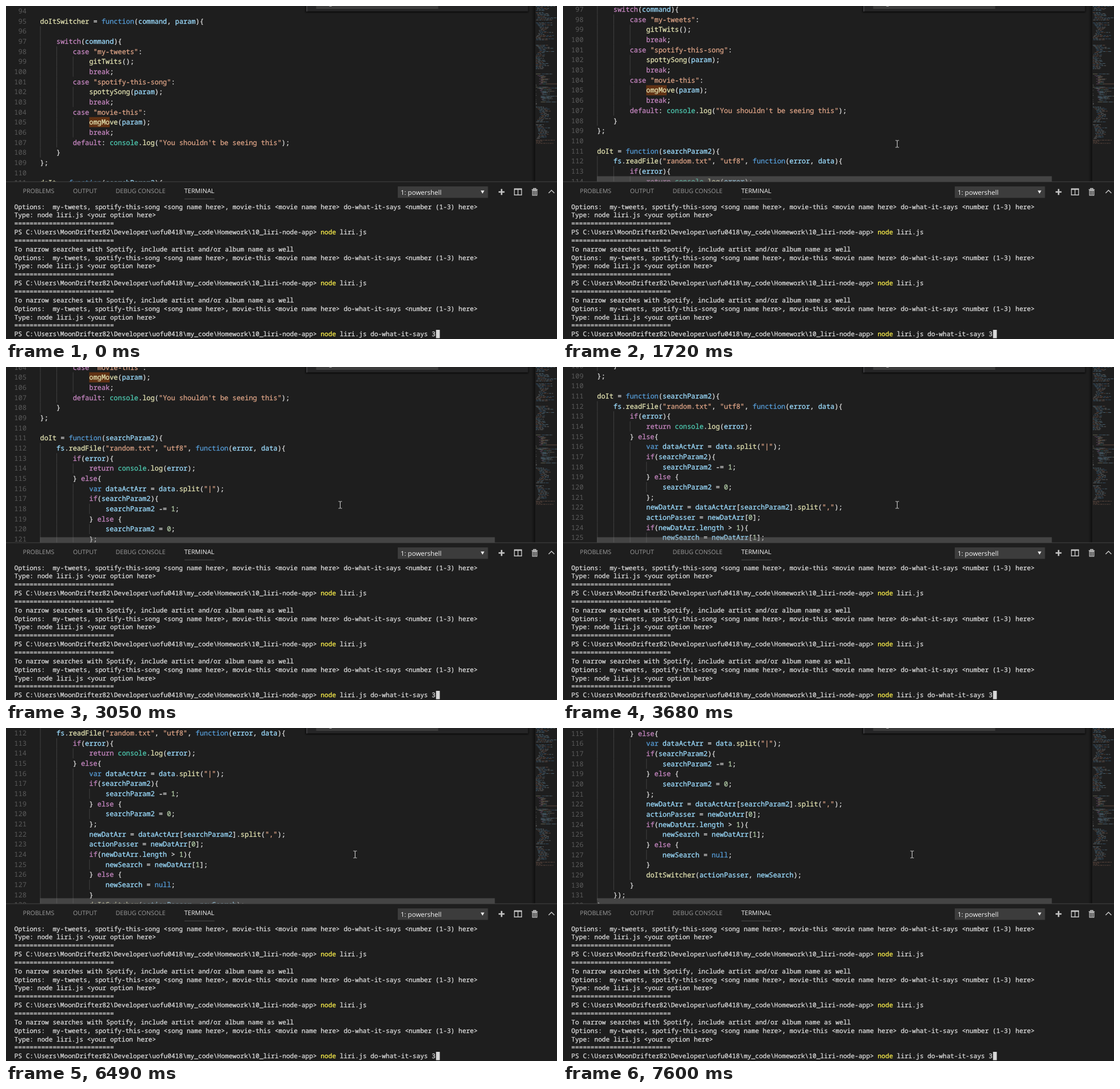
Recreate the animation shown at these times as an HTML page. Size 962 by 582 pixels, loop 8 s.

```html
<!DOCTYPE html>
<html lang="en">
<head>
<meta charset="utf-8">
<title>Editor and terminal</title>
<style>
html, body { margin: 0; width: 100%; height: 100%; overflow: hidden; background: #1e1e1e; }
svg { display: block; width: 962px; height: 582px; }
text { white-space: pre; text-rendering: geometricPrecision; }
text, tspan { fill: currentColor; }
.code, .term, .code tspan, .term tspan { stroke: currentColor; stroke-width: .3px; }
.code { font: 11.91px "Noto Sans Mono", "DejaVu Sans Mono", monospace; color: #dcdcdc; }
.code.num { color: #5a5a5a; text-anchor: end; stroke: none; }
.term { font: 11.15px "Noto Sans Mono", "DejaVu Sans Mono", monospace; color: #dadada; }
.ui { font: 10.6px "Open Sans", "Noto Sans", sans-serif; color: #9b9b9b; }
</style>
</head>
<body>
<svg viewBox="0 0 962 582" xmlns="http://www.w3.org/2000/svg">
  <defs>
    <clipPath id="editorClip"><rect width="922" height="307"/></clipPath>
    <clipPath id="mapClip"><rect x="924" width="38" height="307"/></clipPath>
    <linearGradient id="edge">
      <stop offset="0" stop-color="#000" stop-opacity="0"/>
      <stop offset="1" stop-color="#000" stop-opacity=".5"/>
    </linearGradient>
    <filter id="soft" x="-5%" y="-100%" width="110%" height="400%"><feGaussianBlur stdDeviation="1.8"/></filter>
  </defs>
  <rect width="962" height="582" fill="#1e1e1e"/>

  <g clip-path="url(#editorClip)">
    <g id="code"></g>
    <rect id="bar" x="59.5" y="297.5" width="794" height="10" fill="#797979" fill-opacity=".42"/>
    <rect x="523" y="-10" width="389" height="21" fill="#000" opacity=".8" filter="url(#soft)"/>
    <rect x="524" y="-2" width="387.5" height="11.5" fill="#252526"/>
    <rect x="524" y="-2" width="2.5" height="11.5" fill="#38383b"/>
    <rect x="541.5" y="-2" width="213" height="7" fill="#3c3c3c"/>
    <text class="ui" x="545" y="-2" style="font-size:12px;color:#ccc">omgM</text>
  </g>
  <rect x="917" width="7" height="307" fill="url(#edge)"/>
  <g id="map" clip-path="url(#mapClip)"></g>

  <rect y="306.6" width="962" height="1" fill="#454545"/>
  <g class="ui">
    <text x="29.5" y="327.3">PROBLEMS</text>
    <text x="117" y="327.3">OUTPUT</text>
    <text x="191.6" y="327.3">DEBUG CONSOLE</text>
    <text x="311.3" y="327.3" style="font-size:10.9px;color:#f4f4f4">TERMINAL</text>
  </g>
  <rect x="311.5" y="336.7" width="52.5" height="1" fill="#4c4c4c"/>
  <rect x="684" y="315.3" width="157.5" height="20" fill="#3c3c3c"/>
  <text class="ui" x="689" y="329.8" style="font-size:11.5px;color:#f4f4f4">1: powershell</text>
  <path d="M828.8 322.4h6.4l-3.2 5.6z" fill="#f0f0f0"/>
  <g fill="none" stroke="#c5c5c5">
    <path d="M860 325h10.4M865.2 319.8v10.4" stroke-width="2.6"/>
    <path d="M887.6 320.2h12.6M887.6 319.5v10.8h12.6v-10.8M893.9 320v10" stroke-width="1.4"/>
    <path d="M887 320h13.8" stroke-width="2.6"/>
    <path d="M917.8 321h10.4M921 320.6v-1.6h4v1.6" stroke-width="1.4"/>
    <path d="M919.3 322.4h7.6v8.4h-7.6z" stroke-width="1.3"/>
    <path d="M921.8 323v7M924.4 323v7" stroke-width="1.3"/>
    <path d="M947.4 327l5-5 5 5" stroke-width="1.5"/>
  </g>

  <g id="term"></g>
  <rect x="750.8" y="566" width="6.6" height="14.6" fill="#d8d8d8"/>
  <path id="mouse" d="M-3-6h2q1 0 1 1v10q0 1-1 1h-2M3-6h-2q-1 0-1 1v10q0 1 1 1h2" fill="none" stroke="#d6d6d6"/>
</svg>
<script>
const LOOP = 8000, FIRST = 94, PITCH = 17.67, CHAR = 7.147, LEFT = 59.5;
const $ = id => document.getElementById(id);

function add(parent, tag, attrs, content) {
  const el = document.createElementNS('http://www.w3.org/2000/svg', tag);
  for (const key in attrs) el.setAttribute(key, attrs[key]);
  if (content !== undefined) el.textContent = content;
  parent.appendChild(el);
  return el;
}

const source = `
doItSwitcher = function(command, param){

    switch(command){
        case "my-tweets":
            gitTwits();
            break;
        case "spotify-this-song":
            spottySong(param);
            break;
        case "movie-this":
            omgMove(param);
            break;
        default: console.log("You shouldn't be seeing this");
    }
};

doIt = function(searchParam2){
    fs.readFile("random.txt", "utf8", function(error, data){
        if(error){
            return console.log(error);
        } else{
            var dataActArr = data.split("|");
            if(searchParam2){
                searchParam2 -= 1;
            } else {
                searchParam2 = 0;
            };
            newDatArr = dataActArr[searchParam2].split(",");
            actionPasser = newDatArr[0];
            if(newDatArr.length > 1){
                newSearch = newDatArr[1];
            } else {
                newSearch = null;
            }
            doItSwitcher(actionPasser, newSearch);
        }
    });
};`.split('\n');

const NAME = '#9cdcfe';
const rules = [
  [/^"/, '#dba285'],
  [/^(switch|case|break|default|if|else|return)$/, '#c586c0'],
  [/^(function|var|null)$/, '#569cd6'],
  [/^console$/, '#4ec9b0'],
  [/^\d/, '#b5cea8'],
  [/^[a-z]/i, NAME],
  [/./, '#dcdcdc']
];

// Splits a line into coloured pieces with their columns.
function tokens(line) {
  return [...line.matchAll(/"[^"]*"|[a-z]\w*|\d+|[^a-z\d"]+/gi)].map(m => {
    const rest = line.slice(m.index + m[0].length);
    let color = rules.find(r => r[0].test(m[0]))[1];
    if (color === NAME && /^(\(| = function)/.test(rest)) color = '#e3e3b2';
    return { text: m[0], col: m.index, color };
  });
}

function buildCode() {
  const root = $('code');
  source.forEach((line, i) => {
    const n = FIRST + i, y = 207.2 + (n - 105) * PITCH;
    const depth = n === 96 ? 1 : Math.floor(line.search(/\S|$/) / 4);
    for (let d = 0; d < depth; d++)
      add(root, 'rect', { x: LEFT + d * 4 * CHAR, y: y - 13, width: 1, height: PITCH, fill: '#404040' });
    if (n === 105)
      add(root, 'rect', { x: LEFT + 12 * CHAR, y: y - 13, width: 5 * CHAR, height: PITCH, fill: '#613214' });
    add(root, 'text', { class: 'code num', x: 35.8, y }, n);
    const text = add(root, 'text', { class: 'code', x: LEFT, y });
    tokens(line).forEach(k => add(text, 'tspan', { color: k.color }, k.text));
  });
}

function buildTerminal() {
  const rule = '='.repeat(26);
  const prompt = 'PS C:\\Users\\MoonDrifter82\\Developer\\uofu0418\\my_code\\Homework\\10_liri-node-app> ';
  const help = [
    'To narrow searches with Spotify, include artist and/or album name as well',
    'Options:  my-tweets, spotify-this-song <song name here>, movie-this <movie name here> do-what-it-says <number (1-3) here>',
    'Type: node liri.js <your option here>'
  ];
  const run = [prompt + 'node liri.js', rule, ...help, rule];
  const rows = [...help.slice(1), rule, ...run, ...run, prompt + 'node liri.js do-what-it-says 3'];
  rows.forEach((row, i) => {
    const text = add($('term'), 'text', { class: 'term', x: 14.6, y: 354.6 + i * 14.84 });
    if (!row.startsWith('PS')) { text.textContent = row; return; }
    add(text, 'tspan', {}, prompt);
    add(text, 'tspan', { color: '#f8ec4a' }, 'node');
    add(text, 'tspan', {}, row.slice(prompt.length + 4));
  });
}

function buildMap() {
  let seed = 7;
  const rand = () => (seed = seed * 16807 % 2147483647) / 2147483647;
  const dash = (x, y, width, fill) =>
    add($('map'), 'rect', { x, y, width, height: 0.8, fill, opacity: 0.42 });
  const hues = [NAME, NAME, '#569cd6', '#d4d4d4', '#ce9178'];

  source.forEach((line, i) => tokens(line).forEach(k => {
    if (k.text.trim()) dash(925 + k.col * 0.72, 117 + i * 1.44, k.text.trim().length * 0.66, k.color);
  }));

  // top, bottom, deepest indent, longest line
  const blocks = [
    [0, 8, 3, 34], [11, 25, 4, 30], [29, 54, 9, 28], [55, 60, 1, 36], [68, 86, 7, 30],
    [87, 110, 0, 24], [176, 203, 10, 26], [207, 233, 7, 20], [234, 241, 1, 36]
  ];
  blocks.forEach(([top, bottom, indent, len]) => {
    for (let y = top; y < bottom; y += 1.86) {
      const p = (y - top) / (bottom - top);
      let x = 925 + indent * Math.sin(Math.PI * p) * (0.6 + 0.4 * rand());
      const end = x + len * (0.2 + 0.8 * rand());
      while (x < end) {
        const w = 1.5 + 4 * rand();
        dash(x, y, w, top === 234 ? hues[4] : hues[Math.floor(rand() * hues.length)]);
        x += w + 1.2;
      }
    }
  });
}

// first step time, last step time, steps, offset reached
const scrolls = [
  [1230, 1720, 7, 55.7], [1800, 2430, 9, 111.6], [2500, 3680, 16, 258.2], [3750, 3840, 2, 269],
  [5630, 5630, 1, 278.5], [5710, 5950, 4, 309], [6490, 6490, 1, 317.8],
  [6570, 6900, 5, 343.5], [7050, 7130, 2, 354], [7430, 7600, 3, 370.2]
];

// Share of a stepped move that is done at time t.
function stepped(t, start, end, count) {
  if (t < start) return 0;
  if (t >= end) return 1;
  return (1 + Math.floor((t - start) / (end - start) * (count - 1) + 1e-6)) / count;
}

function scrollAt(t) {
  let y = 0;
  for (const [start, end, count, to] of scrolls) y += (to - y) * stepped(t, start, end, count);
  return y;
}

function mouseAt(t) {
  const enter = (stepped(t, 290, 680, 6) - 1 / 6) * 1.2;
  const p = 1 - (1 - enter) ** 2;
  const shift = stepped(t, 4300, 4390, 2);
  return [20 + 563.5 * p + 26 * shift, 574 - 333 * p - 20 * shift];
}

function draw(t) {
  $('code').setAttribute('transform', `translate(0 ${-scrollAt(t)})`);
  $('mouse').setAttribute('transform', `translate(${mouseAt(t).join(' ')})`);
  $('mouse').setAttribute('opacity', t < 290 ? 0 : 1);
  $('bar').setAttribute('opacity', stepped(t, 600, 680, 2));
}

buildCode();
buildTerminal();
buildMap();
const began = performance.now();
function tick() {
  draw((performance.now() - began) % LOOP);
  requestAnimationFrame(tick);
}
tick();
</script>
</body>
</html>
```
